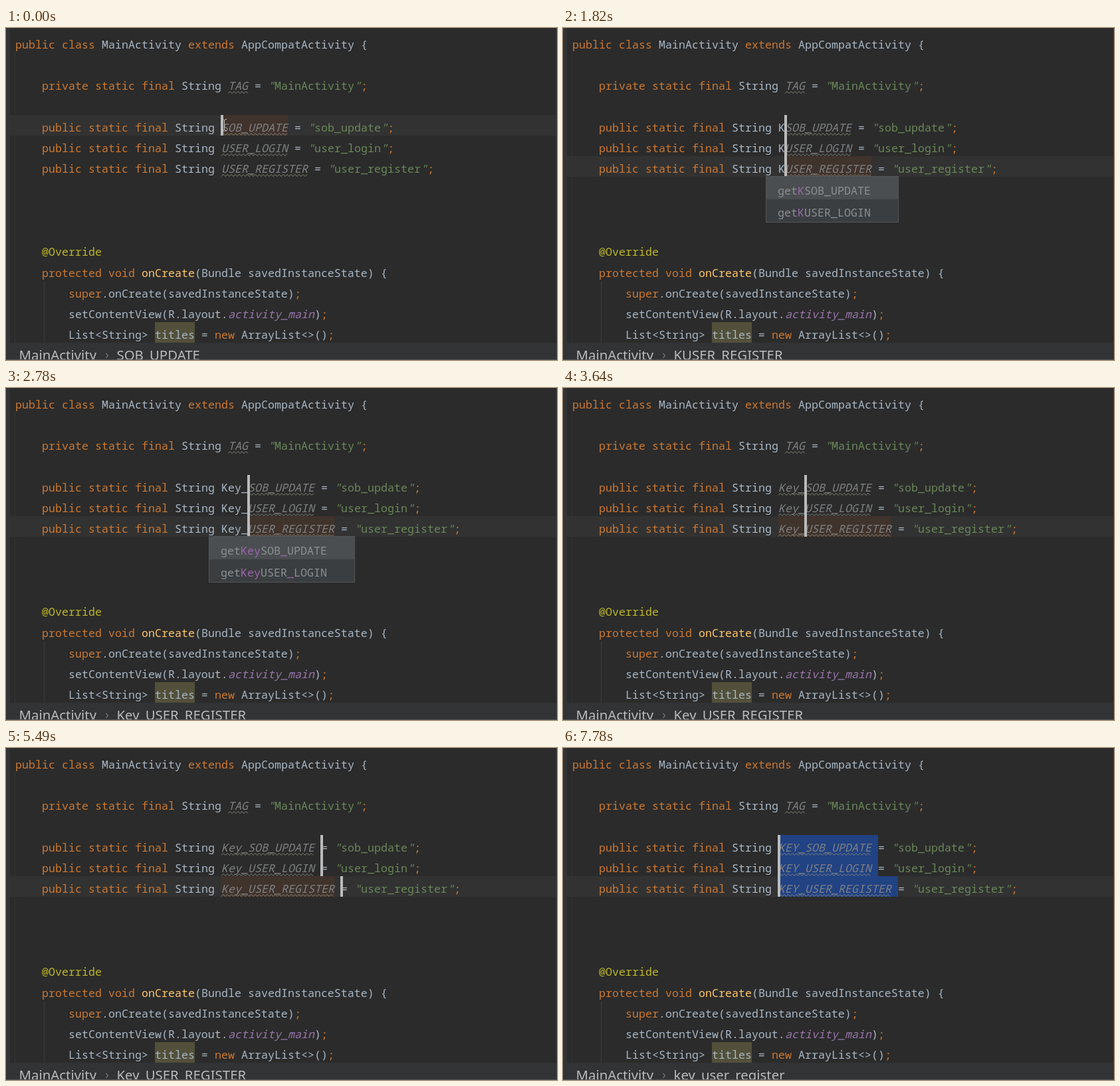
Write an HTML page with a canvas that moves like this. It is 829 px wide and 500 px high and loops after 8000 ms.

```html
<!DOCTYPE html>
<html lang="en">
<head>
<meta charset="utf-8">
<title>Multi-caret editing</title>
<style>
  html, body { margin: 0; width: 100%; height: 100%; overflow: hidden; background: #2b2b2b; }
  canvas { display: block; width: 829px; height: 500px; }
</style>
</head>
<body>
<canvas id="stage" width="829" height="500"></canvas>
<script>
const ctx = document.getElementById('stage').getContext('2d');
const LOOP = 8000, CHAR = 10, PITCH = 31.25, ROW_H = 31, LEFT = 14;
const MONO = '16.667px "Noto Sans Mono", "DejaVu Sans Mono", monospace';
const SANS = '20.4px "Noto Sans", "Open Sans", sans-serif';
const THIN = 'normal 300', SLANT = 'italic 300';
const C = {
  back: '#2b2b2b', bar: '#313335', line: '#323232', guide: '#393939',
  key: '#cc7832', text: '#a9b7c6', str: '#6a8759', unused: '#7f8082',
  method: '#ffc66d', note: '#bbb529', field: '#9876aa',
  select: '#214283', write: '#40332b', read: '#52503a', caret: '#bbbbbb'
};
const FIRST = 4, NAME_COL = 31;
const NAMES = ['SOB_UPDATE', 'USER_LOGIN', 'USER_REGISTER'];

const colX = col => LEFT + col * CHAR;
const rowY = row => Math.round(5.9 + row * PITCH);

function rect(x, y, w, h, color) {
  ctx.fillStyle = color;
  ctx.fillRect(x, y, w, h);
}

function mono(str, x, y, color, style = THIN) {
  ctx.font = style + ' ' + MONO;
  ctx.fillStyle = color;
  ctx.fillText(str, x, y);
}

// Parts are [text, colour, font style] and follow each other on one row.
function code(row, col, ...parts) {
  for (const [str, color, style] of parts) {
    mono(str, colX(col), rowY(row) + 25, C[color], style);
    col += str.length;
  }
}

// A string literal with leaning quotes.
const literal = str => [['"', 'str', SLANT], [str, 'str'], ['"', 'str', SLANT]];

function squiggle(row, col, len) {
  const y = rowY(row) + 27, end = colX(col + len);
  ctx.strokeStyle = '#85857a';
  ctx.lineWidth = 1;
  ctx.beginPath();
  for (let x = colX(col), i = 0; x <= end; x += 3, i++) {
    ctx.lineTo(x, y + (i % 2 ? 0.5 : 3.5));
  }
  ctx.stroke();
}

function fixedCode() {
  code(0, 0, ['public class ', 'key'], ['MainActivity ', 'text'], ['extends ', 'key'], ['AppCompatActivity {', 'text']);
  code(2, 4, ['private static final ', 'key'], ['String ', 'text'], ['TAG', 'unused', SLANT],
    [' = ', 'text'], ...literal('MainActivity'), [';', 'key']);
  squiggle(2, 32, 3);
  code(10, 4, ['@Override', 'note']);
  code(11, 4, ['protected void ', 'key'], ['onCreate', 'method', 'normal 400'], ['(Bundle savedInstanceState) {', 'text']);
  code(12, 8, ['super', 'key'], ['.onCreate(savedInstanceState)', 'text'], [';', 'key']);
  code(13, 8, ['setContentView(R.layout.', 'text'], ['activity_main', 'field', SLANT], [')', 'text'], [';', 'key']);
  rect(colX(21), rowY(14), 60, ROW_H, C.read);
  code(14, 8, ['List<String> titles = ', 'text'], ['new ', 'key'], ['ArrayList<>()', 'text'], [';', 'key']);
}

function stateAt(t) {
  const typed = t < 1420 ? '' : t < 1970 ? 'K' : t < 2130 ? 'Ke' : t < 2530 ? 'Key' : 'Key_';
  const merged = t >= 3640;
  const selected = (t >= 4380 && t < 5490) || t >= 6210;
  const atEnd = t >= 4380 && t < 6210;
  const recase = s => t < 7230 ? s : t < 7780 ? s.toLowerCase() : s.toUpperCase();
  const crumb = t < 1690 ? 'SOB_UPDATE' : t < 2280 ? 'KUSER_REGISTER'
    : t < 2780 ? 'KeyUSER_REGISTER' : t < 7350 ? 'Key_USER_REGISTER' : 'key_user_register';
  return {
    typed, merged, selected, atEnd, recase, crumb,
    multi: t >= 430,
    selectFrom: t < 6210 ? 4 : 0,
    caretOn: !((t >= 3370 && t < 3640) || (t >= 5350 && t < 5490)),
    popup: t >= 1690 && t < 3370,
    mouseY: t < 150 ? 146 : t < 280 ? 180 : t < 1420 ? 211 : null
  };
}

function constantRow(i, s) {
  const row = FIRST + i, y = rowY(row);
  const full = s.typed + NAMES[i];
  const prefix = s.merged ? '' : s.typed;
  const name = s.merged ? s.recase(full) : NAMES[i];
  const nameCol = NAME_COL + prefix.length;
  const endCol = NAME_COL + full.length + 1;
  const active = i === (s.multi ? 2 : 0);

  if (active) rect(colX(nameCol), y, name.length * CHAR, ROW_H, C.write);
  if (s.selected) {
    const from = NAME_COL + s.selectFrom;
    rect(colX(from), y, (endCol - from) * CHAR, ROW_H, C.select);
  }
  code(row, 4, ['public static final ', 'key'], ['String ', 'text'], [prefix, 'text'],
    [name, 'unused', SLANT], [' = ', 'text'],
    ...literal(NAMES[i].toLowerCase()), [';', 'key']);
  squiggle(row, nameCol, name.length);

  if (s.caretOn && (s.multi || i === 0)) {
    const back = s.selected && s.selectFrom === 0;
    const col = s.atEnd ? endCol : back ? NAME_COL : NAME_COL + s.typed.length;
    rect(colX(col) - 1, y, 4, ROW_H, C.caret);
  }
}

function popup(typed) {
  const letters = typed.replace('_', '');
  const x = 305, y = 223, w = 190 + letters.length * CHAR, h = 70;
  rect(x, y, w, h, '#525557');
  rect(x + 1, y + 1, w - 2, h - 2, '#3b3e40');
  rect(x + 1, y + 1, w - 2, 34, '#4b4e50');
  NAMES.slice(0, 2).forEach((name, i) => {
    const str = 'get' + letters + name, bar = str.indexOf('_');
    [...str].forEach((ch, n) => {
      const hit = (n >= 3 && n < 3 + letters.length) || (n === bar && typed.includes('_'));
      mono(ch, 323 + n * CHAR, 251 + i * 33, hit ? '#9a66ad' : '#8c8f91');
    });
  });
}

function mouse(x, y) {
  ctx.strokeStyle = '#c8c8c8';
  ctx.lineWidth = 1;
  ctx.beginPath();
  for (const d of [-1, 1]) {
    ctx.moveTo(x - 3, y + d * 8.5);
    ctx.lineTo(x - 1, y + d * 8.5);
    ctx.lineTo(x + 0.5, y + d * 7);
    ctx.lineTo(x + 2, y + d * 8.5);
    ctx.lineTo(x + 4, y + d * 8.5);
  }
  ctx.moveTo(x + 0.5, y - 7);
  ctx.lineTo(x + 0.5, y + 7);
  ctx.stroke();
}

function breadcrumbs(crumb) {
  rect(0, 474, 829, 26, C.bar);
  ctx.font = SANS;
  ctx.fillStyle = '#bbbbbb';
  ctx.fillText('MainActivity', 19.5, 500);
  ctx.fillText(crumb, 166.5, 500);
  ctx.strokeStyle = '#777a7c';
  ctx.lineWidth = 1.2;
  ctx.beginPath();
  ctx.moveTo(150.5, 490);
  ctx.lineTo(153.5, 493.5);
  ctx.lineTo(150.5, 497);
  ctx.stroke();
  rect(0, 499, 829, 1, '#505254');
}

function draw(t) {
  const s = stateAt(t);
  const current = FIRST + (s.multi ? 2 : 0);
  rect(0, 0, 829, 500, C.back);
  rect(0, 0, 6, 500, C.bar);
  rect(6, rowY(current), 823, ROW_H, C.line);
  rect(13, rowY(1), 1, 474 - rowY(1), '#333333');
  rect(57, rowY(12), 1, 474 - rowY(12), C.guide);
  fixedCode();
  NAMES.forEach((_, i) => constantRow(i, s));
  if (s.popup) popup(s.typed);
  if (s.mouseY !== null) mouse(328, s.mouseY);
  breadcrumbs(s.crumb);
  rect(828, 0, 1, 500, '#3a3c3e');
}

const start = performance.now();
function tick() {
  draw((performance.now() - start) % LOOP);
  requestAnimationFrame(tick);
}
tick();
</script>
</body>
</html>
```
